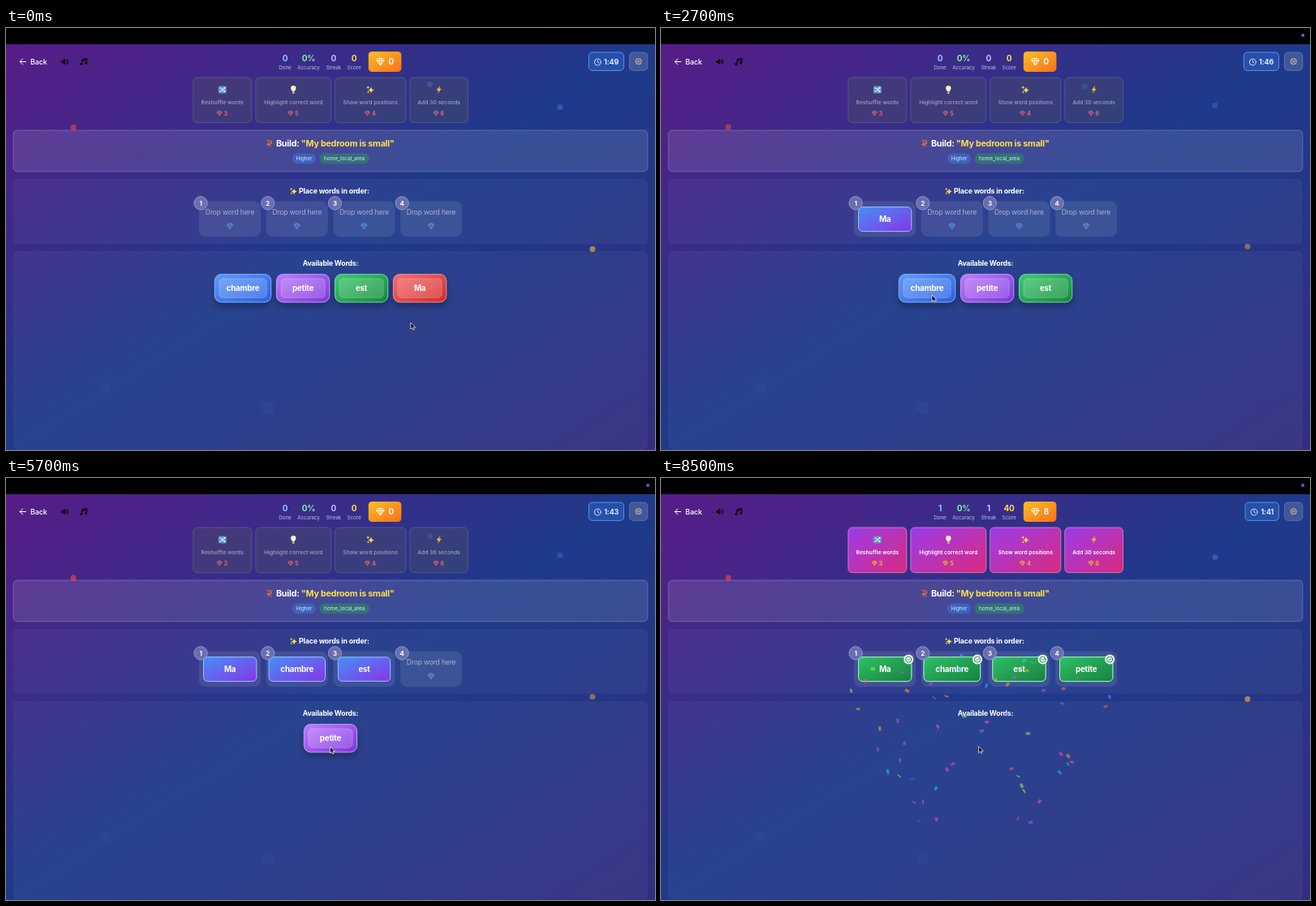
Animation of 800 by 520 pixels, one loop 8600 ms. Source, as an HTML page:

```html
<!DOCTYPE html>
<html lang="en">
<head>
<meta charset="utf-8">
<title>Sentence builder</title>
<style>
  html, body { margin: 0; width: 100%; height: 100%; overflow: hidden; background: #000; }
  svg { display: block; width: 100vw; height: 100vh; }
  text { font-family: Inter, "Open Sans", sans-serif; letter-spacing: -.02em; white-space: pre; }
  .line { fill: none; stroke-linecap: round; stroke-linejoin: round; }
</style>
</head>
<body>
<svg id="stage" viewBox="0 0 800 520" xmlns="http://www.w3.org/2000/svg"></svg>
<script>
const LOOP = 8600, SOLVED = 6600, BURST = 6950;
const stage = document.getElementById('stage');

const COLORS = {
  blue: ['#629bf9', '#2a5fe4', '#93c5fd'],
  purple: ['#bd7dfc', '#7f35dc', '#d8b4fe'],
  green: ['#3fca72', '#15883c', '#86efac'],
  red: ['#f47070', '#d32929', '#fca5a5'],
  placed: ['#468ff6', '#8636e8', '#93c5fd'],
  right: ['#2fc065', '#178240', '#9af5b8'],
  power: ['#9a3cea', '#d92a80', '#f08cc8'],
  coin: ['#fbbf24', '#f9701a', 'none']
};

// Shelf order; grab and drop are times in the loop
const WORDS = [
  { text: 'chambre', color: 'blue', w: 69.5, slot: 1, grab: 2850, drop: 3900 },
  { text: 'petite', color: 'purple', w: 65.3, slot: 3, grab: 5900, drop: SOLVED },
  { text: 'est', color: 'green', w: 65.3, slot: 2, grab: 4600, drop: 5300 },
  { text: 'Ma', color: 'red', w: 65.3, slot: 0, grab: 650, drop: 1700 }
];

const PATH = [
  [0, 498.8, 363], [450, 511, 322], [650, 511, 322], [1450, 258.5, 235], [1900, 258.5, 235],
  [2600, 334, 329], [2850, 334, 329], [3500, 350, 245], [3900, 353, 243], [4300, 435.5, 321],
  [4600, 435.5, 321], [5150, 439, 238], [5300, 439, 238], [5700, 399.5, 331], [5900, 399.5, 331],
  [6450, 524, 240], [6600, 524, 240], [6900, 388.5, 310], [8500, 391.5, 330.5], [LOOP, 391.5, 330.5]
];

const CARDS = [
  { x: 230.8, w: 72, label: 'Reshuffle words', cost: 3, icon: 'shuffle' },
  { x: 307.8, w: 93, label: 'Highlight correct word', cost: 5, icon: 'bulb' },
  { x: 405.6, w: 87.2, label: 'Show word positions', cost: 4, icon: 'sparkles' },
  { x: 497.8, w: 71.7, label: 'Add 30 seconds', cost: 6, icon: 'bolt' }
];

const STATS = [
  { x: 344, label: 'Done', color: '#93c5fd' },
  { x: 373, label: 'Accuracy', color: '#86efac' },
  { x: 403.7, label: 'Streak', color: '#d8b4fe' },
  { x: 429, label: 'Score', color: '#fde047' }
];

// x, base y, bob height, period, time of the highest point, colour, opacity
const MOTES = [
  [522.5, 71, -2, 4700, 1900, '#3b82f6', .4],
  [683, 96, 2, 4700, 1900, '#3b82f6', .4],
  [83, 121, 2.6, 2800, 1850, '#ef4444', .55],
  [723, 270.5, 2.4, 4700, 1900, '#d9a441', .6]
];

const clamp = v => Math.max(0, Math.min(1, v));
const smooth = v => v * v * (3 - 2 * v);
const easeOut = v => 1 - (1 - clamp(v)) ** 3;
const mix = (a, b, k) => a + (b - a) * k;
const slotX = i => 238 + 82.7 * i;

// Markup helpers
const rect = (x, y, w, h, r, rest = '') =>
  `<rect x="${x}" y="${y}" width="${w}" height="${h}" rx="${r}" ${rest}/>`;
const text = (x, y, size, weight, fill, str, rest = 'text-anchor="middle"') =>
  `<text x="${x}" y="${y}" font-size="${size}" font-weight="${weight}" fill="${fill}" ${rest}>${str}</text>`;
const line = (d, color, width, rest = '') =>
  `<path class="line" d="${d}" stroke="${color}" stroke-width="${width}" ${rest}/>`;
const at = (x, y, inner, scale = 1) => `<g transform="translate(${x} ${y}) scale(${scale})">${inner}</g>`;
const gem = (x, y, size, color, fill = 'none') => at(x, y,
  `<path class="line" d="M-6-9H6l4 6L0 10-10-3zM-1-9-4-3 0 10 4-3 1-9M-10-3h20" stroke="${color}" stroke-width="2" style="fill:${fill}"/>`,
  size / 22);
const star = (x, y, r) => at(x, y,
  '<path d="M0-4Q.7-.7 4 0 .7.7 0 4-.7.7-4 0-.7-.7 0-4Z" fill="#fcd34d"/>', r / 4);
const sparkles = star(.8, .6, 4) + star(-3, -2.8, 1.9) + star(-2.8, 3, 1.6);

const ICONS = {
  shuffle: rect(-5, -4.5, 10, 9, 1.5, 'fill="#5f93bd"') +
    line('M-3.2-2h1.6L1.4 2h1.8M-3.2 2h1.6L1.4-2h1.8M2.2-3 3.3-2 2.2-1M2.2 1 3.3 2 2.2 3', '#fff', .9),
  bulb: '<path d="M-1.5 2.2C-1.6.9-3.2.2-3.2-1.8a3.2 3.2 0 0 1 6.4 0C3.2.2 1.6.9 1.5 2.2Z" fill="#fbf0c0"/>' +
    rect(-1.4, 2.5, 2.8, 2.4, .8, 'fill="#b5b5bd"'),
  sparkles,
  bolt: '<path d="M1.6-5-3.2.7H-.4L-1.7 5 3.2-1.2H.4Z" fill="#fbb52b"/>'
};

const gradients = Object.entries(COLORS).map(([id, [a, b]]) =>
  `<linearGradient id="${id}" x2="1" y2="1"><stop stop-color="${a}"/><stop offset="1" stop-color="${b}"/></linearGradient>`).join('');

const defs = `<defs>${gradients}
  <linearGradient id="sky" gradientUnits="userSpaceOnUse" x1="175.3" y1="-89.6" x2="624.7" y2="629.6">
    <stop stop-color="#581c87"/><stop offset=".5" stop-color="#1e3a8a"/><stop offset="1" stop-color="#312e81"/>
  </linearGradient>
  <filter id="shade" x="-30%" y="-40%" width="160%" height="220%">
    <feDropShadow dx="0" dy="5" stdDeviation="4" flood-opacity=".3"/>
  </filter></defs>`;

// Loose word tile, centred on the origin
const tile = ({ text: str, color, w }) =>
  rect(-w / 2, -17.2, w, 34.4, 8, `fill="url(#${color})" stroke="${COLORS[color][2]}" stroke-opacity=".75" filter="url(#shade)"`) +
  rect(-w / 2 + 5.5, -11.7, w - 11, 23.4, 5, 'fill="#fff" fill-opacity=".16" stroke="#fff" stroke-opacity=".45" stroke-width=".8" stroke-dasharray="1.5 1"') +
  text(0, 3.5, 9.8, 700, '#fff', str);

// Word sitting in a slot
const placed = ({ text: str, w }) => {
  const face = color => rect(-w / 2, -15, w, 30, 5, `fill="url(#${color})" stroke="${COLORS[color][2]}"`);
  return face('placed') +
    `<g data-solved>${face('right')}${at(w / 2 - 3.6, -12,
      '<circle r="6" fill="#f0fdf4"/><circle r="3.6" class="line" stroke="#15803d" stroke-width=".9"/>' +
      line('M-1.5 0-.4 1.1 1.6-1', '#15803d', .9))}</g>` +
    text(0, 3.5, 9.8, 700, '#fff', str);
};

const card = ({ x, w, label, cost, icon }) => {
  const cx = x + w / 2;
  const face = (ink, tint, attrs) => rect(x, 61, w, 55.6, 5, attrs) +
    text(cx, 94.4, 6.7, 600, ink, label, 'text-anchor="middle" style="letter-spacing:0"') +
    gem(cx - 3.6, 105, 6.4, tint, tint + '55') + text(cx + 4, 107.5, 7, 700, tint, cost);
  return `<g data-locked>${face('#9795b8', '#e0647c', 'fill="#4b5563" fill-opacity=".36" stroke="#9ca3af" stroke-opacity=".35" stroke-width=".8"')}</g>` +
    `<g data-solved>${face('#fff', '#fbb424', `fill="url(#power)" stroke="${COLORS.power[2]}" stroke-opacity=".8" stroke-width=".9"`)}</g>` +
    at(cx, 76, ICONS[icon]);
};

const slot = i => {
  const x = slotX(i), cx = x + 38;
  return rect(x, 213.6, 76, 43.6, 8, 'fill="#fff" fill-opacity=".09"') +
    rect(x + 5, 217.5, 66, 36.5, 5, `id="glow${i}" fill="#f59e0b" fill-opacity=".22" stroke="#fbbf24" stroke-width="1.8"`) +
    `<g id="hint${i}">${text(cx, 230.2, 8.6, 400, '#a9aed2', 'Drop word here')}${gem(cx, 244.2, 8, '#5d90cf', '#3f6cb4')}</g>`;
};
const badge = i => {
  const x = slotX(i) + 2;
  return `<circle cx="${x}" cy="215.8" r="8.2" fill="#7075b4" fill-opacity=".88" stroke="#aab0dc" stroke-opacity=".8" stroke-width=".8"/>` +
    text(x, 218.6, 7.8, 700, '#fff', i + 1);
};

const header = line('M24.5 41.5H17.2M20.6 38 17.2 41.5 20.6 45', '#fff', 1) +
  text(30, 44.8, 9, 500, '#fff', 'Back', '') +
  at(72.5, 41.5, '<path d="M-4.5-1.5h2L.3-4V4L-2.5 1.5h-2z"/>' +
    line('M1.8-1.6q1.3 1.6 0 3.2M3.2-3q2.5 3 0 6', '#000', .9)) +
  at(96, 41.5, line('M-2.2 3V-2.6L3.6-4V1.8M-2.2-.8 3.6-2.2', '#000', 1.1) +
    '<circle cx="-3.3" cy="3" r="1.4"/><circle cx="2.5" cy="1.9" r="1.4"/>') +
  STATS.map((s, i) => text(s.x, 41, 10, 700, s.color, '', `text-anchor="middle" id="stat${i}"`) +
    text(s.x, 51.2, 6.4, 400, '#b9bcdc', s.label)).join('') +
  rect(446.8, 29, 40.6, 25, 4.5, 'fill="url(#coin)"') + gem(461.5, 41.5, 10, '#fff') +
  text(474.8, 45, 9.8, 700, '#fff', '', 'text-anchor="middle" id="coins"') +
  `<rect id="clockBox" y="30" height="22.4" rx="4.5" fill="#3b82f6" fill-opacity=".3" stroke="#60a5fa" stroke-opacity=".8"/>` +
  `<g id="clock">${at(0, 42, '<circle r="4" class="line" stroke="#dbeafe" stroke-width=".9"/>' + line('M0-2.3V.2L1.6 1', '#dbeafe', .9))}</g>` +
  text(755.2, 45.1, 9, 700, '#dbeafe', '', 'text-anchor="end" id="time"') +
  rect(768.5, 30, 22.4, 22.4, 4.5, 'fill="#fff" fill-opacity=".15" stroke="#fff" stroke-opacity=".25" stroke-width=".8"') +
  at(779.7, 41.3, '<circle r="3.4" class="line" stroke="#aaa594" stroke-width="1.3"/><circle r="1.2" fill="#aaa594"/>' +
    line('M-3 0H3M-1.5-2.6 1.5 2.6M1.5-2.6-1.5 2.6', '#aaa594', .5));

const prompt = rect(9, 126, 782, 50.8, 5, 'fill="#fff" fill-opacity=".11" stroke="#fff" stroke-opacity=".25" stroke-width=".9"') +
  at(325, 142, line('M-3.4-3.6 2.6-2.6M-1.2-3.2V4M-1.2-.5 2 4M1.8-2.6V0', '#e2603c', 1.1) +
    line('M-3.2 1.2H0M1 0H2.8', '#d9a23c', 1)) +
  text(333, 146.2, 10.7, 700, '#fff', 'Build: <tspan fill="#fde047">"My bedroom is small"</tspan>', '') +
  rect(353, 154.6, 29, 12.6, 6.3, 'fill="#3b82f6" fill-opacity=".42"') + text(367.4, 163.3, 6.6, 400, '#cfe2fe', 'Higher') +
  rect(386.3, 154.6, 61.5, 12.6, 6.3, 'fill="#22a559" fill-opacity=".42"') + text(417, 163.3, 6.6, 400, '#c5f5d4', 'home_local_area');

const four = [0, 1, 2, 3];
const soft = 'fill="#fff" fill-opacity=".045"';

// Confetti pieces from a fixed seed
let seed = 41;
const rand = () => (seed = (seed * 16807) % 2147483647) / 2147483647;
const INKS = ['#26ccff', '#a25afd', '#ff5e7e', '#88ff5a', '#a25afd', '#ffa62d', '#ff36ff'];
const BITS = Array.from({ length: 60 }, (_, i) => ({
  angle: (rand() - .5) * 1.22, reach: 115 + rand() * 200, spin: rand() * 6.3,
  rate: 4 + rand() * 4, ink: INKS[i % INKS.length], round: rand() < .4
}));

stage.innerHTML = defs +
  rect(0, 0, 800, 520, 0) + rect(0, 20, 800, 500, 0, 'fill="url(#sky)"') +
  '<circle id="dot" cx="791.2" cy="9" r="2" fill="#6357ee"/>' +
  rect(9, 186, 782, 80, 5, soft) + rect(9, 275, 782, 244.5, 5, soft) +
  '<circle cx="323" cy="468" r="8" fill="#3b82f6" opacity=".08"/><circle cx="123" cy="443" r="7" fill="#3b82f6" opacity=".06"/>' +
  MOTES.map((m, i) => rect(m[0] - 3.4, -3.4, 6.8, 6.8, 2.8, `id="mote${i}" fill="${m[5]}"`)).join('') +
  header + CARDS.map(card).join('') + prompt +
  at(354.4, 201, sparkles, .9) + text(361, 204, 8.8, 700, '#fff', 'Place words in order:', '') +
  four.map(slot).join('') +
  WORDS.map((w, i) => `<g id="placed${i}">${placed(w)}</g>`).join('') +
  four.map(badge).join('') +
  text(400, 293.2, 8.7, 700, '#fff', 'Available Words:') +
  WORDS.map((w, i) => `<g id="tile${i}">${tile(w)}</g>`).join('') +
  WORDS.map((w, i) => `<g id="drag${i}" opacity=".92">${tile(w)}</g>`).join('') +
  '<g id="confetti">' + BITS.map(b => rect(-2.7, -1.9, 5.4, 3.8, b.round ? 1.9 : .3, `fill="${b.ink}"`)).join('') + '</g>' +
  '<path id="cursor" d="M0 0V8L1.9 6.3 3.2 9 4.5 8.4 3.3 5.8H5.8Z" fill="#000" stroke="#fff" stroke-width=".7" stroke-linejoin="round"/>';

const refs = {};
stage.querySelectorAll('[id]').forEach(el => refs[el.id] = el);
const solvedParts = stage.querySelectorAll('[data-solved]');
const lockedParts = stage.querySelectorAll('[data-locked]');
const bits = [...refs.confetti.children];

const move = (el, x, y, extra = '') => el.setAttribute('transform', `translate(${x} ${y}) ${extra}`);
const fade = (el, v) => el.setAttribute('opacity', v);
const show = (el, on) => el.setAttribute('display', on ? 'inline' : 'none');
const write = (el, str) => { if (el.textContent !== String(str)) el.textContent = str; };

function pointer(t) {
  const i = Math.max(1, PATH.findIndex(p => p[0] > t));
  const [t0, x0, y0] = PATH[i - 1], [t1, x1, y1] = PATH[i];
  const k = smooth((t - t0) / (t1 - t0));
  return [mix(x0, x1, k), mix(y0, y1, k)];
}

// Centre of a word when the shelf is packed at time t
function packed(word, t) {
  const row = WORDS.filter(w => w.drop > t || w === word);
  let x = 400 - (row.reduce((sum, w) => sum + w.w, 0) + 6.7 * (row.length - 1)) / 2;
  for (const w of row) {
    if (w === word) return x + w.w / 2;
    x += w.w + 6.7;
  }
}

function shelf(word, t) {
  const last = Math.max(0, ...WORDS.map(w => w.drop).filter(d => d <= t));
  return last ? mix(packed(word, last - 1), packed(word, t), easeOut((t - last) / 160)) : packed(word, t);
}

function drawWords(t, [px, py]) {
  WORDS.forEach((word, i) => {
    const held = t >= word.grab && t < word.drop, sx = slotX(word.slot);
    const x = shelf(word, t), enter = easeOut((t - word.drop - 220) / 240);
    show(refs['tile' + i], t < word.drop);
    move(refs['tile' + i], x, 320.6);
    fade(refs['tile' + i], held ? .42 : 1);

    const [gx, gy] = pointer(word.grab);
    show(refs['drag' + i], held);
    move(refs['drag' + i], x + px - gx, 320.6 + py - gy);

    show(refs['placed' + i], enter > 0);
    move(refs['placed' + i], sx + 38.1, 235.6, `scale(${enter})`);
    fade(refs['hint' + word.slot], 1 - clamp((t - word.drop) / 180));
  });
  const holding = WORDS.some(w => t >= w.grab && t < w.drop);
  four.forEach(i => show(refs['glow' + i],
    holding && px > slotX(i) && px < slotX(i) + 76 && py > 213 && py < 258));
}

function drawConfetti(t) {
  const s = (t - BURST) / 1000;
  show(refs.confetti, s > 0);
  if (s <= 0) return;
  const spread = 1 - .9 ** (s * 60);
  fade(refs.confetti, 1 - s / 3.3);
  BITS.forEach((b, i) => {
    const d = b.reach * spread, turn = b.spin + s * b.rate;
    move(bits[i], 390 + Math.sin(b.angle) * d + 5 * Math.cos(turn),
      370 - Math.cos(b.angle) * d + 100 * s + 5 * Math.sin(turn),
      `rotate(${turn * 57}) scale(1 ${.25 + .75 * Math.abs(Math.cos(turn * 1.3))})`);
  });
}

function draw(t) {
  const tip = pointer(t), solved = t >= SOLVED;
  move(refs.cursor, ...tip);
  show(refs.dot, t >= 100);
  MOTES.forEach(([, y, h, period, peak, , alpha], i) => {
    const wave = Math.cos((t - peak) / period * 2 * Math.PI);
    move(refs['mote' + i], 0, y - h * wave);
    fade(refs['mote' + i], alpha * (1 - .25 * wave));
  });

  (solved ? [1, '0%', 1, 40] : [0, '0%', 0, 0]).forEach((v, i) => write(refs['stat' + i], v));
  write(refs.coins, solved ? 8 : 0);

  const sec = 49 - Math.max(0, Math.floor((t + 400) / 1000));
  const left = 718.4 + (sec % 10 === 7 ? .8 : sec % 10 === 1 ? 1.7 : 0);
  refs.clockBox.setAttribute('x', left);
  refs.clockBox.setAttribute('width', 761.6 - left);
  move(refs.clock, left + 11, 0);
  write(refs.time, '1:' + sec);

  const k = clamp((t - SOLVED) / 250);
  solvedParts.forEach(el => fade(el, k));
  lockedParts.forEach(el => fade(el, 1 - k));
  drawWords(t, tip);
  drawConfetti(t);
}

const start = performance.now();
function tick() {
  draw((performance.now() - start) % LOOP);
  requestAnimationFrame(tick);
}
tick();
</script>
</body>
</html>
```
